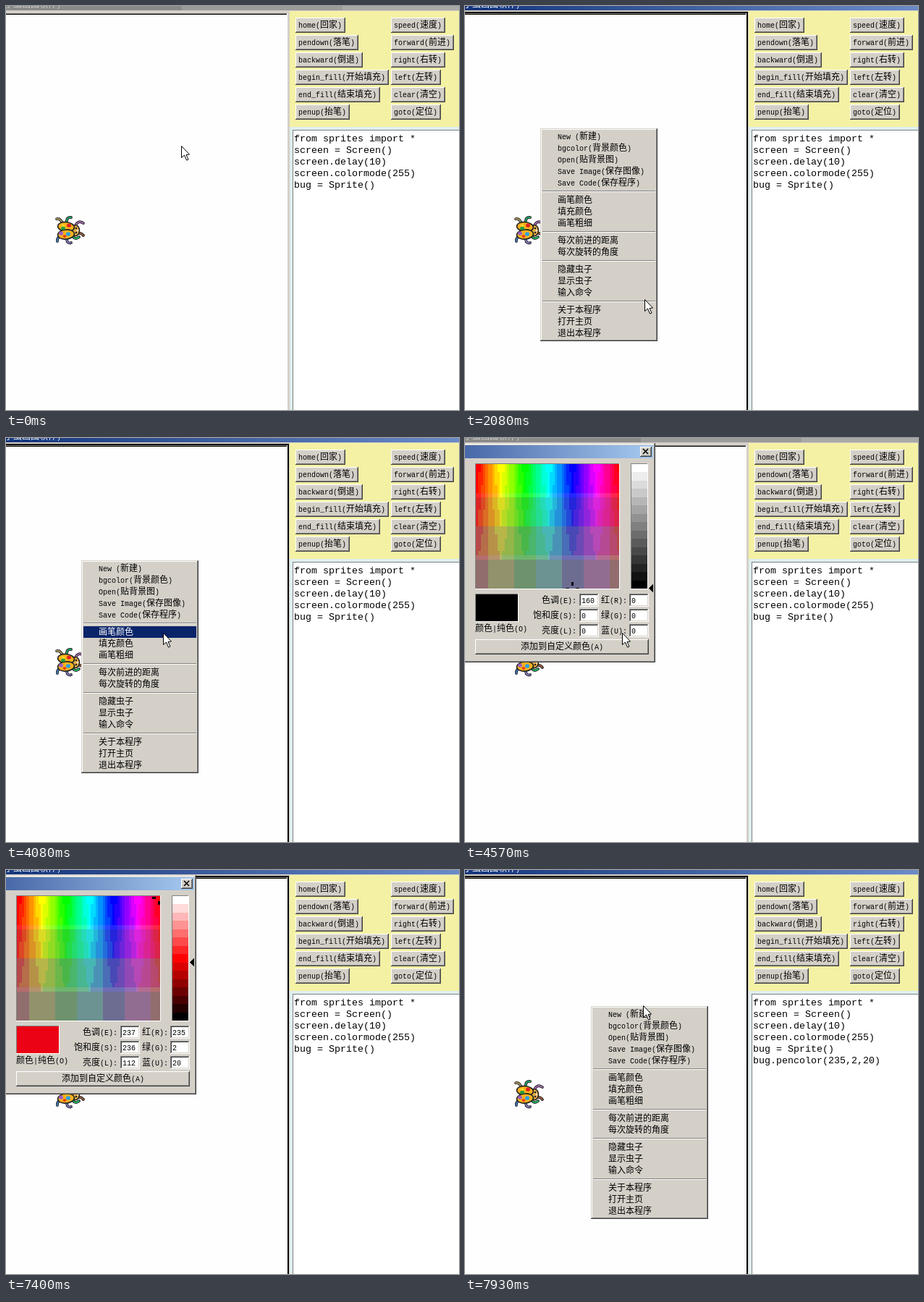
An HTML page with a canvas that plays this animation: 626x558 px, repeating every 8000 ms.

```html
<!DOCTYPE html>
<html lang="zh">
<head>
<meta charset="utf-8">
<title>Bug drawing</title>
<style>
html, body { margin: 0; width: 100%; height: 100%; overflow: hidden; background: #fff; }
canvas { display: block; }
</style>
</head>
<body>
<canvas id="stage" width="626" height="558"></canvas>
<script>
const ctx = document.getElementById('stage').getContext('2d');
const LOOP = 8000;
const FACE = '#d4d0c8', SHADE = '#808080', DARK = '#404040', NAVY = '#0a246a';
const CJK = '"Noto Sans CJK SC", "Noto Sans CJK", sans-serif';
const MONO = '"Liberation Mono", monospace';

// Cursor moves: pts[0] is where the cursor rests before the first step.
const MOVES = [
  { from: 60, to: 300, steps: 5, pts: [[242, 193], [176, 168]] },
  { from: 1420, to: 2200, steps: 14, pts: [[176, 168], [196, 163], [250, 165], [325, 188],
    [356, 250], [335, 345], [248, 405], [226, 412]] },
  { from: 2320, to: 2500, steps: 4, pts: [[226, 412], [216, 414]] },
  { from: 3550, to: 4080, steps: 10, ease: 1.3, pts: [[216, 414], [217, 269]] },
  { from: 5000, to: 5180, steps: 4, pts: [[217, 269], [63, 199]] },
  { from: 5860, hidden: true },
  { from: 6850, to: 6910, steps: 2, pts: [[10, 283], [12, 282]] },
  { from: 6970, hidden: true },
  { from: 7640, to: 7880, steps: 5, pts: [[9, 285], [246, 187]] }
];

const BUTTONS = [
  ['home(回家)', 'pendown(落笔)', 'backward(倒退)', 'begin_fill(开始填充)', 'end_fill(结束填充)', 'penup(抬笔)'],
  ['speed(速度)', 'forward(前进)', 'right(右转)', 'left(左转)', 'clear(清空)', 'goto(定位)']
];
const CODE = ['from sprites import *', 'screen = Screen()', 'screen.delay(10)',
  'screen.colormode(255)', 'bug = Sprite()'];
const MENU = ['New (新建)', 'bgcolor(背景颜色)', 'Open(贴背景图)', 'Save Image(保存图像)', 'Save Code(保存程序)', '',
  '画笔颜色', '填充颜色', '画笔粗细', '', '每次前进的距离', '每次旋转的角度', '',
  '隐藏虫子', '显示虫子', '输入命令', '', '关于本程序', '打开主页', '退出本程序'];

function rect(x, y, w, h, color) {
  ctx.fillStyle = color;
  ctx.fillRect(x, y, w, h);
}

function edges(x, y, w, h, light, dark) {
  rect(x, y, w, 1, light);
  rect(x, y, 1, h, light);
  rect(x, y + h - 1, w, 1, dark);
  rect(x + w - 1, y, 1, h, dark);
}

function raised(x, y, w, h, outer = '#fff', inner = FACE) {
  rect(x, y, w, h, FACE);
  edges(x, y, w, h, outer, DARK);
  edges(x + 1, y + 1, w - 2, h - 2, inner, SHADE);
}

function sunken(x, y, w, h, fill) {
  rect(x, y, w, h, fill);
  edges(x, y, w, h, SHADE, '#fff');
}

const isLatin = run => run.charCodeAt(0) < 256;
const textWidth = (str, size) =>
  [...str].reduce((sum, ch) => sum + (isLatin(ch) ? size / 2 : size), 0);

// Latin glyphs take half a cell, Chinese glyphs a full one.
function text(str, x, midY, color = '#000', size = 12) {
  ctx.fillStyle = color;
  const base = midY + Math.round(size / 3);
  for (const run of str.match(/[\x00-\xff]+|[^\x00-\xff]+/g)) {
    ctx.font = isLatin(run) ? `${size / 1.2}px ${MONO}` : `${size}px ${CJK}`;
    ctx.fillText(run, x, base);
    x += textWidth(run, size);
  }
}

function shade(x0, x1, a, b) {
  const g = ctx.createLinearGradient(x0, 0, x1, 0);
  g.addColorStop(0, a);
  g.addColorStop(1, b);
  return g;
}

function drawWindow(active, lines) {
  rect(0, 0, 626, 558, FACE);
  if (active) {
    rect(0, 0, 626, 6, shade(0, 626, '#15357c', '#6b8bc7'));
  } else {
    rect(0, 0, 243, 6, '#8a8a8a');
    rect(243, 0, 222, 6, '#9b9b9b');
    rect(465, 0, 161, 6, '#a9a9a9');
  }
  text('小虫画图软件)', -2, -2, active ? '#fff' : FACE);

  rect(0, 8, 391, 550, active ? '#000' : FACE);
  rect(0, 10, 389, 548, '#fff');
  rect(0, 10, 388, 1, SHADE);
  rect(0, 11, 388, 1, '#000');
  rect(0, 12, 388, 546, '#fefefe');

  rect(392, 7, 234, 161, '#f4f1a4');
  rect(392, 167, 234, 391, '#e0eeee');
  rect(396, 171, 230, 387, SHADE);
  rect(397, 172, 229, 386, '#fff');
  BUTTONS.forEach((column, c) => column.forEach((label, r) => {
    const x = c ? 532 : 400, y = 16 + r * 24;
    raised(x, y, textWidth(label, 12) + 9, 21);
    text(label, x + 4, y + 10);
  }));
  lines.forEach((line, i) => text(line, 398, 182 + i * 16, '#000', 16));
}

function leg(color, ...p) {
  for (const [width, stroke] of [[3.8, '#222'], [1.8, color]]) {
    ctx.beginPath();
    ctx.moveTo(p[0], p[1]);
    ctx.quadraticCurveTo(p[2], p[3], p[4], p[5]);
    ctx.lineWidth = width;
    ctx.strokeStyle = stroke;
    ctx.stroke();
  }
}

function oval(x, y, rx, ry, fill, outline, turn = 0) {
  ctx.beginPath();
  ctx.ellipse(x, y, rx, ry, turn, 0, Math.PI * 2);
  ctx.fillStyle = fill;
  ctx.fill();
  if (outline) {
    ctx.strokeStyle = outline;
    ctx.lineWidth = 1.6;
    ctx.stroke();
  }
}

function drawBug() {
  ctx.save();
  ctx.translate(88, 310);
  ctx.lineCap = 'round';
  leg('#b0a060', -10, -9, -12, -17, -18, -16);
  leg('#20b070', -4, -10, -5, -19, 2, -18);
  leg('#b070c0', 8, -7, 12, -15, 19, -10);
  leg('#a06040', 12, 4, 16, 3, 19, 7);
  leg('#20c060', 5, 9, 8, 13, 13, 9);
  leg('#8878c8', -4, 11, -4, 19, 2, 17);
  leg('#4080d0', -11, 8, -18, 9, -17, 15);
  oval(8, 0, 5.5, 7.5, '#e8b048', '#222');
  oval(-5, -5, 11.5, 6.5, '#f8b31c', '#222', 0.1);
  oval(-5, 5.5, 11.5, 6.5, '#f8b31c', '#222', -0.1);
  oval(-1, -7, 3, 2.6, '#e02020');
  oval(-9, -3, 3, 2.2, '#20a040');
  oval(-9, -7, 2, 1.6, '#f8e030');
  oval(-12, 4, 3, 2.6, '#a060c0');
  oval(-2, 5, 3, 2.8, '#30a0e0');
  oval(-7, 8, 2.4, 2, '#e84020');
  oval(9, -3, 1.3, 1.3, '#222');
  oval(9, 3, 1.3, 1.3, '#222');
  oval(11, 0, 1.2, 1.2, '#fff');
  ctx.restore();
}

function drawMenu(x, y, cursor) {
  raised(x, y, 162, 294, FACE, '#fff');
  let top = y + 3;
  for (const label of MENU) {
    const height = label ? 16 : 8;
    if (label) {
      const hot = cursor && cursor[0] > x && cursor[0] < x + 162 &&
        cursor[1] >= top && cursor[1] < top + height;
      if (hot) rect(x + 3, top, 156, height, NAVY);
      text(label, x + 24, top + 8, hot ? '#fff' : '#000');
    } else {
      rect(x + 3, top + 3, 156, 1, SHADE);
      rect(x + 3, top + 4, 156, 1, '#fff');
    }
    top += height;
  }
}

// HSL to a colour with a limited number of levels per channel.
function coarse(h, s, l, levels) {
  const a = s * Math.min(l, 1 - l);
  const channel = n => {
    const k = (n + h / 30) % 12;
    const v = l - a * Math.max(-1, Math.min(k - 3, 9 - k, 1));
    return Math.round(Math.min(levels - 1, Math.floor(v * levels)) * 255 / (levels - 1));
  };
  return `rgb(${channel(0)},${channel(8)},${channel(4)})`;
}

function drawSpectrum() {
  sunken(14, 35, 200, 174, FACE);
  const cols = 60, rows = 30;
  const edge = (i, n, start, size) => start + Math.round(i * size / n);
  for (let r = 0; r < rows; r++) {
    const y = edge(r, rows, 36, 172), h = edge(r + 1, rows, 36, 172) - y;
    for (let c = 0; c < cols; c++) {
      const x = edge(c, cols, 15, 198), w = edge(c + 1, cols, 15, 198) - x;
      rect(x, y, w, h, coarse(c * 6, 1 - (r + 0.5) / rows, 0.5, 8));
    }
  }
}

function drawCrosshair(x, y) {
  ctx.save();
  ctx.beginPath();
  ctx.rect(15, 36, 198, 172);
  ctx.clip();
  rect(x - 9, y - 1, 5, 3, '#000');
  rect(x + 5, y - 1, 5, 3, '#000');
  rect(x - 1, y - 9, 3, 5, '#000');
  rect(x - 1, y + 5, 3, 5, '#000');
  ctx.restore();
}

function drawDialog(picked) {
  raised(-10, 7, 273, 303, FACE, '#fff');
  rect(0, 10, 260, 18, shade(0, 260, '#4868a8', '#a6caf0'));
  raised(242, 12, 16, 14);
  ctx.beginPath();
  for (const d of [-1, 1]) {
    ctx.moveTo(246, 18.5 - d * 3.5);
    ctx.lineTo(253, 18.5 + d * 3.5);
  }
  ctx.strokeStyle = '#000';
  ctx.lineWidth = 1.6;
  ctx.stroke();

  drawSpectrum();
  if (picked) drawCrosshair(211, 38);
  else drawCrosshair(148, 208);

  sunken(229, 35, 24, 174, '#000');
  const bands = 15;
  for (let i = 0; i < bands; i++) {
    const y = 36 + Math.round(i * 172 / bands);
    rect(230, y, 22, 208 - y, coarse(0, picked ? 0.98 : 0, 1 - i / (bands - 1), 256));
  }
  const arrow = picked ? 127 : 207;
  for (let i = 0; i < 6; i++) rect(254 + i, arrow - i, 1, 2 * i + 1, '#000');

  sunken(14, 215, 60, 39, picked ? 'rgb(235,2,20)' : '#000');
  text('颜色|纯色(O)', 14, 263);
  const fields = [
    ['色调(E):', '红(R):', 237, 235, 160],
    ['饱和度(S):', '绿(G):', 236, 2, 0],
    ['亮度(L):', '蓝(U):', 112, 20, 0]
  ];
  fields.forEach(([left, right, hsl, rgb, startHsl], i) => {
    const y = 215 + i * 21;
    text(left, 154 - textWidth(left, 12), y + 9);
    text(right, 188, y + 9);
    for (const [x, value] of [[158, picked ? hsl : startHsl], [227, picked ? rgb : 0]]) {
      sunken(x, y, 27, 18, '#fff');
      edges(x + 1, y + 1, 25, 16, DARK, FACE);
      text(String(value), x + 3, y + 9);
    }
  });
  raised(14, 278, 240, 21);
  text('添加到自定义颜色(A)', 77, 288);
}

function cursorAt(t) {
  const move = MOVES.filter(m => m.from <= t).pop();
  if (!move) return MOVES[0].pts[0];
  if (move.hidden) return null;
  const { from, to, steps, pts, ease = 1 } = move;
  const step = Math.min(steps, 1 + Math.floor((t - from) * (steps - 1) / (to - from) + 0.01));
  const u = Math.pow(step / steps, ease) * (pts.length - 1);
  const i = Math.min(pts.length - 2, Math.floor(u));
  return [0, 1].map(k => Math.round(pts[i][k] + (pts[i + 1][k] - pts[i][k]) * (u - i)));
}

function drawCursor([x, y]) {
  const shape = [[0, 0], [0, 16], [4, 12.5], [7, 19.5], [9.5, 18.5], [6.5, 12], [11, 11.5]];
  ctx.beginPath();
  shape.forEach(([dx, dy]) => ctx.lineTo(x + 0.5 + dx, y + 0.5 + dy));
  ctx.closePath();
  ctx.fillStyle = '#fff';
  ctx.fill();
  ctx.strokeStyle = '#000';
  ctx.lineWidth = 1;
  ctx.stroke();
}

function draw(t) {
  const within = (a, b) => t >= a && t < b;
  const active = within(550, 4570) || t >= 7400;
  const cursor = cursorAt(t);
  drawWindow(active, t >= 7460 ? [...CODE, 'bug.pencolor(235,2,20)'] : CODE);
  drawBug();
  if (within(550, 4570)) drawMenu(104, 169, cursor);
  if (within(4570, 7460)) drawDialog(t >= 5860);
  if (t >= 7930) drawMenu(174, 188, cursor);
  if (cursor) drawCursor(cursor);
}

const start = performance.now();
function tick() {
  draw((performance.now() - start) % LOOP);
  requestAnimationFrame(tick);
}
tick();
</script>
</body>
</html>
```
